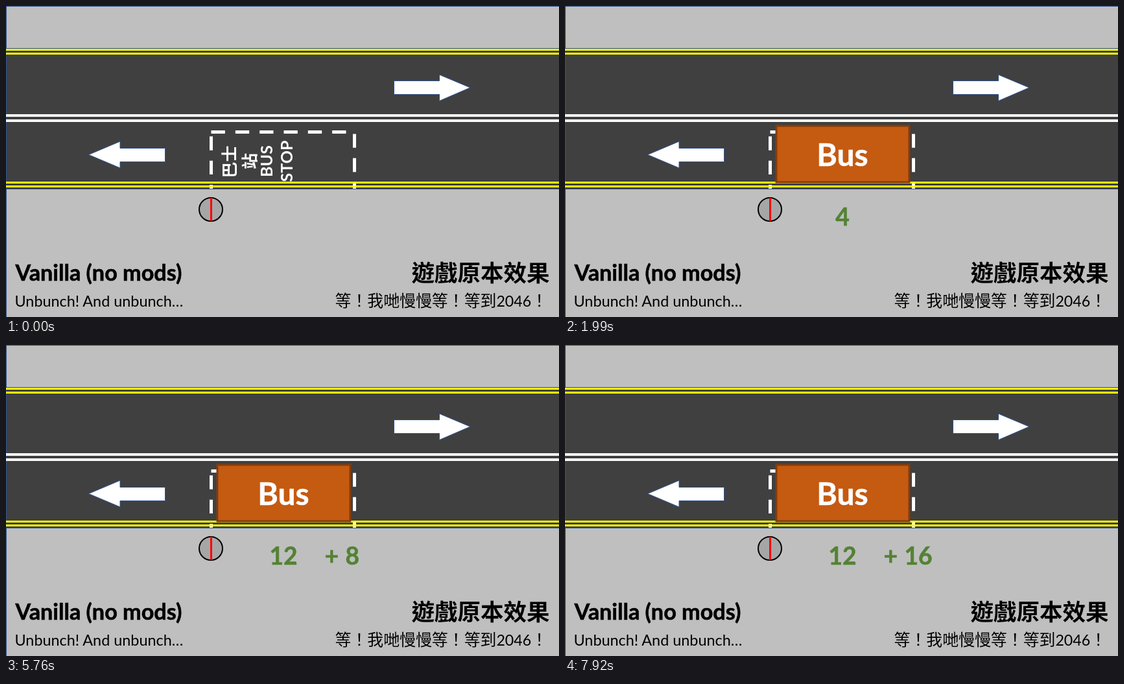
An HTML page for the animation above (8000 ms loop, 853 by 480 pixels).

```html
<!DOCTYPE html>
<html lang="zh-TW">
<head>
<meta charset="utf-8">
<title>Bus stop</title>
<style>
  html, body { margin: 0; width: 100%; height: 100%; overflow: hidden; background: #bfbfbf; }
  svg { display: block; width: 853px; height: 480px; }
  text { font-family: Lato, sans-serif; }
  .bold { font-weight: 700; }
  .heavy { font-weight: 700; stroke: currentColor; stroke-width: .6; }
  .cjk { font-family: "Noto Sans CJK TC", "Noto Sans CJK", sans-serif; }
  .marking { fill: none; stroke: #fff; stroke-width: 5; stroke-dasharray: 21.33 16; }
  .arrow { fill: #fff; stroke: #2f528f; stroke-width: 1; }
  .paint { fill: #fff; font-weight: 700; text-anchor: middle; }
  #count { fill: #548235; color: #548235; font-size: 37.2px; }
</style>
</head>
<body>
<svg viewBox="0 0 853 480">
  <rect x=".5" y=".5" width="854" height="481" fill="#bfbfbf" stroke="#2f528f"/>

  <!-- road -->
  <rect x=".5" y="65.5" width="854" height="217" fill="#404040" stroke="#2f528f"/>
  <path d="M0 169H853M0 177H853" stroke="#fff" stroke-width="4"/>
  <path class="arrow" d="M598.5 115.5H668.5V106L716 126L668.5 146.5V136.5H598.5Z"/>
  <path class="arrow" d="M245.5 219.5H176V209L127.5 229.5L176 250V240.5H245.5Z"/>

  <!-- stop bay -->
  <path class="marking" d="M316.5 194.5H537.5V282"/>
  <path class="marking" d="M316.5 201.3V282"/>
  <path d="M0 67.5H853M0 73.5H853M0 272.5H853M0 278.5H853" stroke="#ff0" stroke-width="3"/>
  <g class="paint">
    <text class="cjk" font-size="25" transform="translate(354 240.5) rotate(-90)">巴士</text>
    <text class="cjk" font-size="25" transform="translate(385 239.5) rotate(-90)">站</text>
    <text font-size="25" transform="translate(411 239.5) rotate(-90)">BUS</text>
    <text font-size="25" transform="translate(441.5 239.5) rotate(-90)">STOP</text>
  </g>
  <circle cx="316" cy="314" r="18" fill="#a6a6a6" stroke="#000" stroke-width="2"/>
  <path d="M316.5 296V332" stroke="#f00" stroke-width="3"/>

  <g id="bus">
    <rect x="1.5" y="185" width="205" height="87" fill="#c55a11" stroke="#843c0c" stroke-width="3"/>
    <text class="heavy" x="103.5" y="247" font-size="48" fill="#fff" color="#fff" text-anchor="middle">Bus</text>
  </g>

  <g id="count" class="heavy">
    <text id="base" x="428" y="339" text-anchor="middle"></text>
    <text id="plus" x="491.5" y="339">+</text>
    <text id="extra" x="523.5" y="339"></text>
  </g>

  <!-- captions -->
  <text class="heavy" x="14.5" y="424" font-size="34.2">Vanilla (no mods)</text>
  <text x="13.5" y="464" font-size="23.4">Unbunch! And unbunch…</text>
  <text class="cjk bold" x="838.5" y="424.5" font-size="35.5" text-anchor="end">遊戲原本效果</text>
  <text class="cjk" x="507.5" y="464" font-size="24.9" font-weight="300">等！我哋慢慢等！等到<tspan font-family="Lato, sans-serif" font-size="23.2" font-weight="400">2046</tspan>！</text>
</svg>
<script>
const LOOP = 8000, STEP = 60;
const DRIVE = { start: 60, duration: 1250, from: 853, to: 324.5 };
const COUNT = { start: 1440, period: 1080, step: 4, max: 12 };
const PULSE = { start: 60, first: 130, duration: 490, ramp: 98 };

const el = id => document.getElementById(id);
const bus = el('bus'), count = el('count'), base = el('base'), plus = el('plus'), extra = el('extra');
const clamp = v => Math.min(1, Math.max(0, v));
const snap = t => Math.floor(t / STEP) * STEP;

function busX(t) {
  const left = 1 - clamp((snap(t) - DRIVE.start) / DRIVE.duration);
  return DRIVE.to + (DRIVE.from - DRIVE.to) * left * left;
}

// Dips to half opacity, holds, then returns.
function pulse(t) {
  if (t < PULSE.first) return 1;
  const s = PULSE.first + snap(t - PULSE.first) - PULSE.start;
  return 1 - 0.5 * clamp(Math.min(s, PULSE.duration - s) / PULSE.ramp);
}

function render(t) {
  bus.setAttribute('transform', `translate(${busX(t).toFixed(2)} 0)`);

  const since = t - COUNT.start;
  const total = Math.max(0, COUNT.step * (Math.floor(since / COUNT.period) + 1));
  const over = total - COUNT.max;
  base.textContent = total ? Math.min(total, COUNT.max) : '';
  plus.textContent = over > 0 ? '+' : '';
  extra.textContent = over > 0 ? over : '';
  count.setAttribute('opacity', since < 0 ? 0 : pulse(since % COUNT.period));
}

const begin = performance.now();
function tick() {
  render((performance.now() - begin) % LOOP);
  requestAnimationFrame(tick);
}
render(0);
requestAnimationFrame(tick);
</script>
</body>
</html>
```
